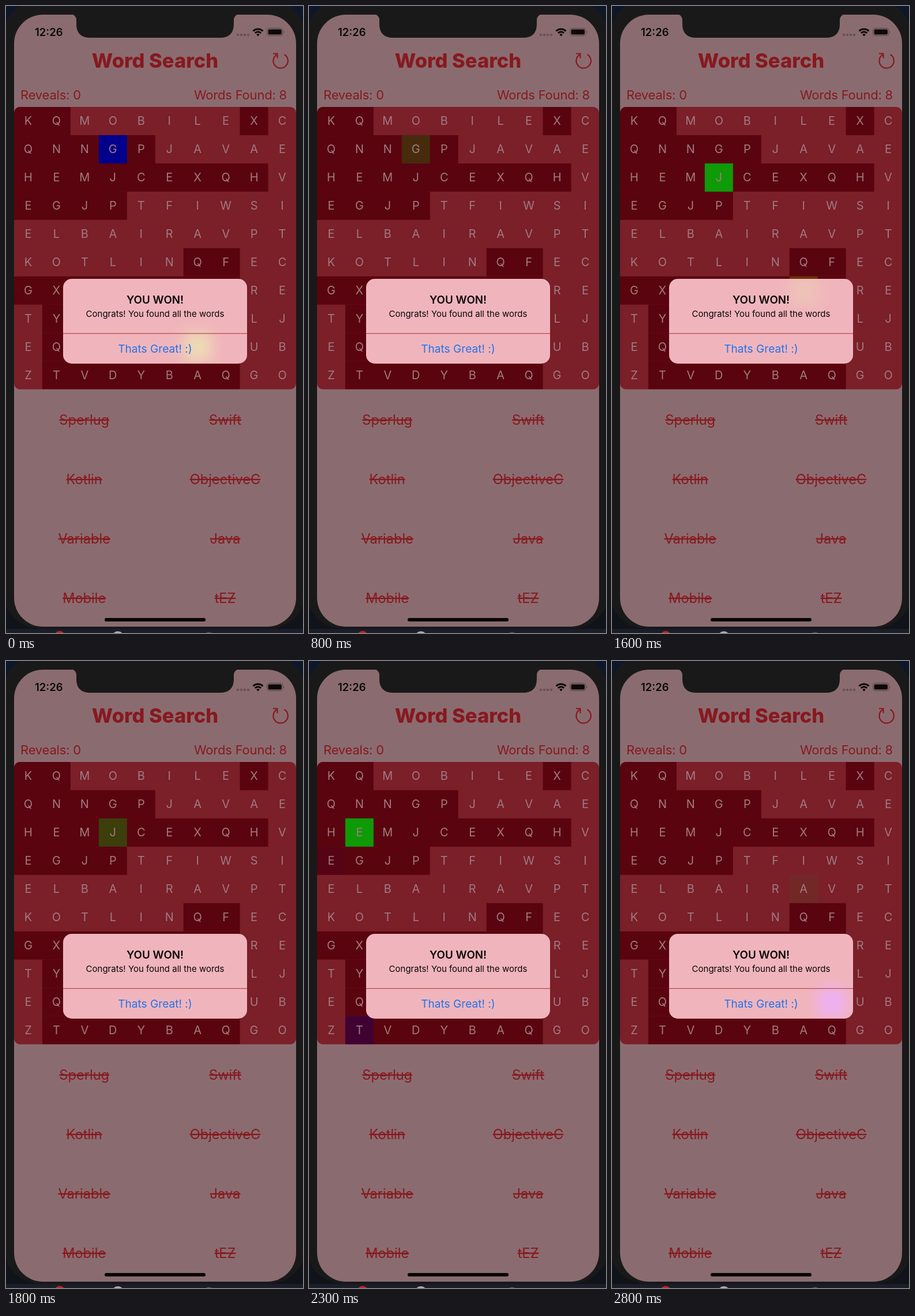
Recreate the animation shown at these times as an HTML page. Size 515 by 1087 pixels, loop 2.9 s.

```html
<!DOCTYPE html>
<html lang="en">
<head>
<meta charset="utf-8">
<title>Word Search</title>
<style>
  html, body { margin: 0; width: 100%; height: 100%; overflow: hidden; background: #0d1729; }
  svg { display: block; width: 515px; height: 1087px; }
  text { font-family: Inter, Roboto, sans-serif; }
  .red { fill: #87191f; }
  .stat { font-size: 22px; letter-spacing: -.2px; }
  .letter { font-size: 20px; fill: #a07b81; text-anchor: middle; }
  .word { font-size: 23.6px; text-anchor: middle; text-decoration: line-through; }
  .mid { text-anchor: middle; }
  .flash { opacity: 0; }
</style>
</head>
<body>
<svg viewBox="0 0 515 1087">
  <defs>
    <clipPath id="board"><rect x="14" y="175" width="489" height="489.5" rx="10"/></clipPath>
    <clipPath id="alert"><rect x="99" y="473" width="319" height="147" rx="15"/></clipPath>
    <filter id="soft" x="-1" y="-1" width="3" height="3"><feGaussianBlur stdDeviation="11"/></filter>
  </defs>

  <!-- phone -->
  <rect width="515" height="1087" fill="#0d1729"/>
  <rect y="1040" width="515" height="47" fill="#11131b"/>
  <rect x="-4" y="-10" width="523" height="1089" rx="62" fill="#1a191a"/>
  <rect y="1080" width="515" height="7" fill="#1b1e29"/>
  <circle cx="93" cy="1093" r="9.5" fill="#c8222a"/>
  <circle cx="194" cy="1095" r="11" fill="#b9a9b8"/>
  <circle cx="352" cy="1096" r="10.5" fill="#5d555c"/>
  <rect x="14" y="15" width="489" height="1061" rx="50" fill="#8a6c70"/>
  <path d="M112 14Q122 15 122 25V31Q122 55 146 55H371Q395 55 395 31V25Q395 15 405 14Z" fill="#1a191a"/>
  <rect x="171" y="1061" width="175" height="6" rx="3" fill="#080506"/>

  <!-- status bar -->
  <text x="50" y="52" font-size="18.5" font-weight="600" fill="#0c0808">12:26</text>
  <g fill="#6c5257">
    <circle cx="402" cy="50" r="2.3"/><circle cx="408" cy="50" r="2.3"/>
    <circle cx="414" cy="50" r="2.3"/><circle cx="420" cy="50" r="2.3"/>
  </g>
  <g fill="none" stroke="#0c0808" stroke-width="3">
    <path d="M428.5 43.5a12 12 0 0 1 17 0M431.8 47a7.4 7.4 0 0 1 10.4 0"/>
    <path d="M437 52.5l-2.8-3a4 4 0 0 1 5.6 0z" fill="#0c0808" stroke="none"/>
  </g>
  <rect x="452.5" y="38.5" width="27.5" height="13" rx="4" fill="none" stroke="#544145"/>
  <rect x="454.5" y="40.5" width="23.5" height="9" rx="2.2" fill="#0c0808"/>
  <path d="M481.5 43q2 2 0 4.5z" fill="#544145"/>

  <!-- header -->
  <text class="red mid" x="258.5" y="107" font-size="34.5" font-weight="800">Word Search</text>
  <path d="M482.5 84A12.7 12.7 0 1 1 469 84.5M463 82.5H470.5V90.5" fill="none" stroke="#87191f" stroke-width="2.2"/>
  <text class="red stat" x="25" y="162">Reveals: 0</text>
  <text class="red stat" x="487" y="162" text-anchor="end">Words Found: 8</text>

  <!-- board -->
  <g clip-path="url(#board)">
    <rect x="14" y="175" width="489" height="490" fill="#7b1f29"/>
    <g id="dark" fill="#5a040f"></g>
    <g id="cells"></g>
    <g id="letters"></g>
  </g>
  <g id="words"></g>

  <!-- alert -->
  <g clip-path="url(#alert)">
    <rect x="99" y="473" width="319" height="147" fill="#f0b5bc"/>
    <g id="glows" filter="url(#soft)"></g>
    <rect x="99" y="567.3" width="319" height="1" fill="#a82f3c"/>
  </g>
  <text class="mid" x="258.5" y="516" font-size="18.8" font-weight="600" fill="#0a0506">YOU WON!</text>
  <text class="mid" x="258.5" y="539" font-size="15" fill="#0a0506">Congrats! You found all the words</text>
  <text class="mid" x="258.5" y="601" font-size="19.1" fill="#2273ec">Thats Great! :)</text>
</svg>
<script>
const LOOP = 2900, STEP = 100, FADE = 350;
const CELL = 48.95, LEFT = 14, TOP = 175;

const rows = ['KQMOBILEXC', 'QNNGPJAVAE', 'HEMJCEXQHV', 'EGJPTFIWSI', 'ELBAIRAVPT',
              'KOTLINQFEC', 'GX      RE', 'TY      LJ', 'EQ      UB', 'ZTVDYBAQGO'];

// unused runs: row, first column, last column
const runs = [[0, 0, 1], [0, 8, 8], [1, 0, 4], [2, 0, 8], [3, 0, 3], [5, 6, 7],
              [6, 0, 7], [7, 1, 7], [8, 1, 7], [9, 1, 7]];

const words = [['Sperlug', 'Swift'], ['Kotlin', 'ObjectiveC'], ['Variable', 'Java'], ['Mobile', 'tEZ']];

// cell colour and its tint seen through the alert
const colors = {
  blue: ['#00008c', '#efb0f2'],
  green: ['#0f9a08', '#cfdcb4'],
  yellow: ['#8c7600', '#eed9b4']
};

// row, column, colour, start in ms
const flashes = [
  [1, 3, 'blue', 0], [8, 6, 'yellow', 0], [2, 4, 'blue', 60], [1, 3, 'green', 570],
  [6, 6, 'yellow', 1400], [2, 3, 'green', 1600], [8, 1, 'yellow', 1810], [1, 2, 'blue', 1880],
  [3, 0, 'blue', 2000], [9, 1, 'blue', 2075], [2, 1, 'green', 2300],
  [4, 6, 'green', 2510], [8, 7, 'blue', 2800]
];

function add(parent, tag, attrs, text = '') {
  const el = document.createElementNS('http://www.w3.org/2000/svg', tag);
  for (const key in attrs) el.setAttribute(key, attrs[key]);
  el.textContent = text;
  document.getElementById(parent).append(el);
  return el;
}

function addCells(parent, row, col, count, attrs) {
  return add(parent, 'rect', {
    x: LEFT + col * CELL, y: TOP + row * CELL, width: CELL * count, height: CELL, ...attrs
  });
}

// full colour at once, then an eased fade, held for each step
function fade(el, start) {
  const frames = [];
  for (let t = 0; t <= LOOP; t += STEP) {
    const age = t - start;
    const on = age >= 0 && age < FADE && t < LOOP;
    frames.push({
      offset: t / LOOP,
      opacity: on ? (1 + Math.cos(Math.PI * age / FADE)) / 2 : 0,
      easing: 'steps(1, end)'
    });
  }
  el.animate(frames, { duration: LOOP, iterations: Infinity });
}

for (const [row, from, to] of runs) addCells('dark', row, from, to - from + 1, {});

rows.forEach((line, r) => [...line].forEach((ch, c) => {
  if (ch !== ' ') add('letters', 'text', {
    class: 'letter', x: LEFT + (c + .5) * CELL, y: TOP + (r + .5) * CELL + 6.8
  }, ch);
}));

words.forEach((pair, r) => pair.forEach((word, c) =>
  add('words', 'text', { class: 'word red', x: c ? 380 : 135.7, y: 725.5 + r * 103 }, word)));

for (const [row, col, name, start] of flashes) {
  const [fill, tint] = colors[name];
  fade(addCells('cells', row, col, 1, { class: 'flash', fill }), start);
  if (row >= 6) fade(addCells('glows', row, col, 1, { class: 'flash', fill: tint }), start);
}
</script>
</body>
</html>
```
